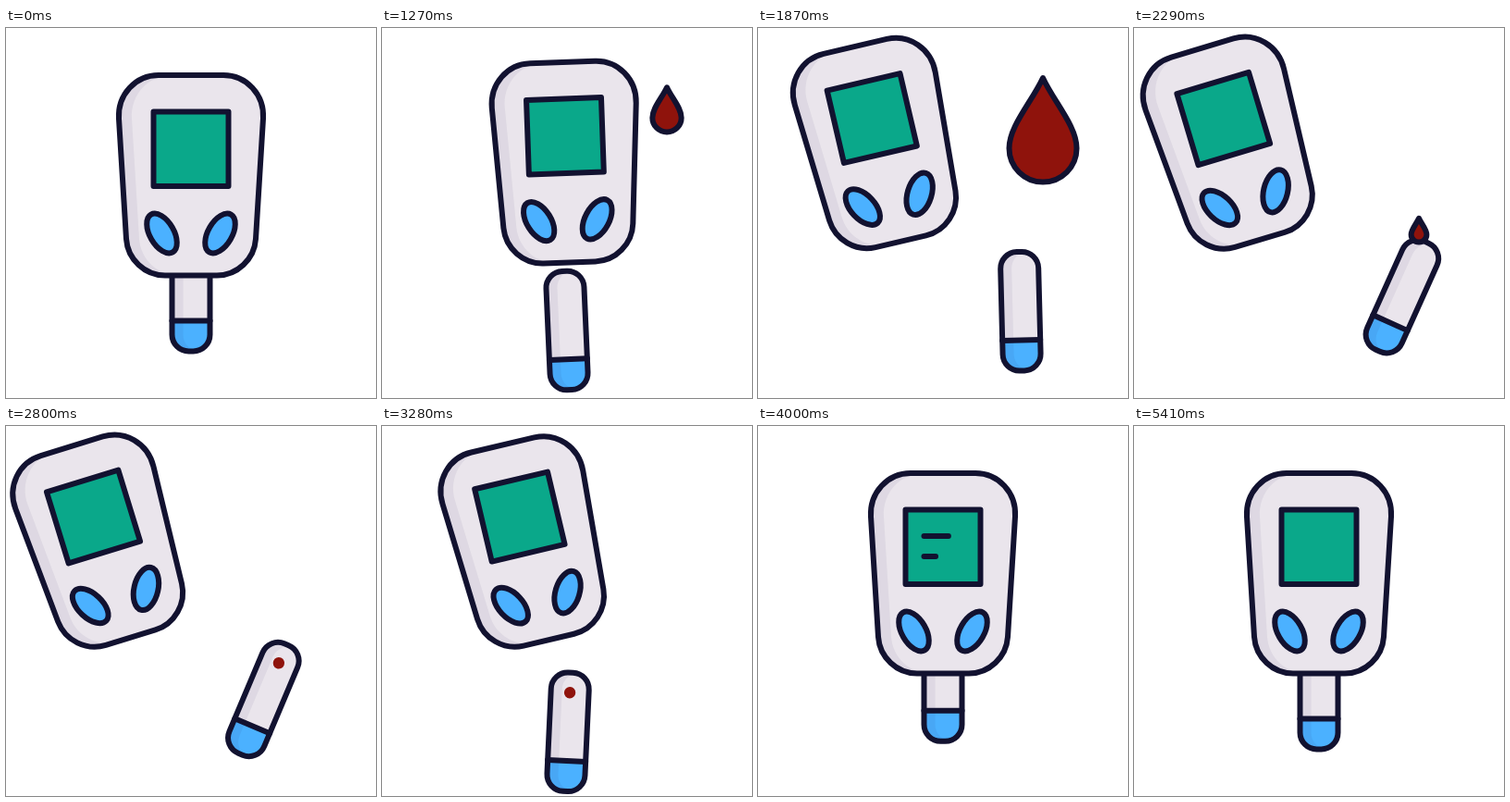
An HTML page for the animation above (5.44 s loop, 400 by 400 pixels).

```html
<!DOCTYPE html>
<html lang="en">
<head>
<meta charset="utf-8">
<title>Glucose meter</title>
<style>
  html, body { margin: 0; height: 100%; overflow: hidden; background: #fff; }
  svg { display: block; width: 100%; height: 100%; }
  .ink { stroke: #121230; stroke-width: 6; stroke-linecap: round; stroke-linejoin: round; vector-effect: non-scaling-stroke; }
  .shell { fill: #eae5ec; }
  .shade { fill: #1a0f50; opacity: .055; }
  .blue { fill: #4bb1ff; }
  .blood { fill: #8f130c; }
</style>
</head>
<body>
<svg viewBox="0 0 400 400">
  <path id="route" fill="none" d="M200 159C200 125 190 125 102 125"/>

  <g id="strip">
    <rect class="shell" x="-20.5" y="-64" width="41" height="128.5" rx="18"/>
    <path class="blue" d="M-20.5 31.5H20.5V46.5A18 18 0 0 1 2.5 64.5H-2.5A18 18 0 0 1-20.5 46.5Z"/>
    <path class="shade" d="M-2.5-64A18 18 0 0 0-20.5-46V46.5A18 18 0 0 0-2.5 64.5H9.5A18 18 0 0 1-8.5 46.5V-46A18 18 0 0 1 9.5-64Z"/>
    <rect class="ink" fill="none" x="-20.5" y="-64" width="41" height="128.5" rx="18"/>
    <path class="ink" d="M-20.5 31.5H20.5"/>
    <circle id="dot" class="blood" cy="-42.3"/>
  </g>

  <g id="meter">
    <g transform="translate(-200 -159)">
      <path class="shell" d="M165 51H235C260 51 279.5 72 278 98L270 228C268.5 250 250 267.5 228 267.5H172C150 267.5 131.5 250 130 228L122 98C120.5 72 140 51 165 51Z"/>
      <path class="shade" d="M165 51C140 51 120.5 72 122 98L130 228C131.5 250 150 267.5 172 267.5H186C164 267.5 145.5 250 144 228L136 98C134.5 72 154 51 179 51Z"/>
      <path class="ink" fill="none" d="M165 51H235C260 51 279.5 72 278 98L270 228C268.5 250 250 267.5 228 267.5H172C150 267.5 131.5 250 130 228L122 98C120.5 72 140 51 165 51Z"/>
      <rect class="ink" fill="#0aa88a" x="159.5" y="90.5" width="81" height="80.5"/>
      <ellipse class="ink blue" rx="13" ry="23.5" transform="translate(168.5 222) rotate(-30)"/>
      <ellipse class="ink blue" rx="13" ry="23.5" transform="translate(231.5 222) rotate(30)"/>
      <g id="reading">
        <line class="ink" x1="179.5" y1="119" y2="119"/>
        <line class="ink" x1="179.5" y1="141" y2="141"/>
      </g>
    </g>
  </g>

  <path id="drop" class="ink blood" d="M0-18C12 8 36.5 34 36.5 58A36.5 36.5 0 0 1-36.5 58C-36.5 34-12 8 0-18Z"/>
</svg>
<script>
const LOOP = 5440;
const [route, strip, dot, meter, reading, drop] =
  ['route', 'strip', 'dot', 'meter', 'reading', 'drop'].map(id => document.getElementById(id));
const [longLine, shortLine] = reading.children;
const routeLength = route.getTotalLength();

const smooth = u => (1 - Math.cos(Math.PI * u)) / 2;
const easeOut = power => u => 1 - (1 - u) ** power;
const quickSmooth = u => smooth(easeOut(1.6)(u));

// Each segment is [start, end, value, easing].
function track(t, value, ...segments) {
  for (const [start, end, next, ease = smooth] of segments) {
    const u = Math.min(1, Math.max(0, (t - start) / (end - start)));
    value += (next - value) * ease(u);
  }
  return value;
}

function place(el, x, y, angle = 0, scale = 1) {
  el.setAttribute('transform', `translate(${x} ${y}) rotate(${angle}) scale(${scale})`);
}

const show = (el, on) => el.setAttribute('visibility', on ? 'visible' : 'hidden');

function draw(t) {
  const along = track(t, 0, [1030, 2680, 1, quickSmooth], [2740, 3900, 0]);
  const tilt = track(t, 0, [1030, 2680, -17.1, quickSmooth], [3000, 3900, 0]);
  const p = route.getPointAtLength(along * routeLength);
  place(meter, p.x, p.y, tilt);

  place(strip,
    track(t, 200, [1430, 1960, 290], [2640, 3330, 200]),
    track(t, 285, [1030, 1330, 331], [1500, 2150, 290], [2640, 3330, 331], [3400, 4057, 275.3], [4057, 4420, 285]),
    track(t, 0, [1030, 1300, -2.6], [1800, 2350, 25], [2650, 3450, 0]));
  dot.setAttribute('r', t < 3900 ? track(t, 0, [2350, 2500, 6.2]) : 0);

  const size = track(t, 0, [1100, 1800, 1, easeOut(2)], [1950, 2450, 0]);
  place(drop, 308, track(t, 72, [1950, 2450, 251]), 0, size);
  show(drop, size > .001);

  const shown = track(t, 0, [3850, 4540, 1, easeOut(4)], [4950, 5410, 0]);
  longLine.setAttribute('x2', 179.5 + 42 * shown);
  shortLine.setAttribute('x2', 179.5 + 20 * shown);
  show(reading, shown > .001);
}

function tick() {
  draw(performance.now() % LOOP);
  requestAnimationFrame(tick);
}
tick();
</script>
</body>
</html>
```
